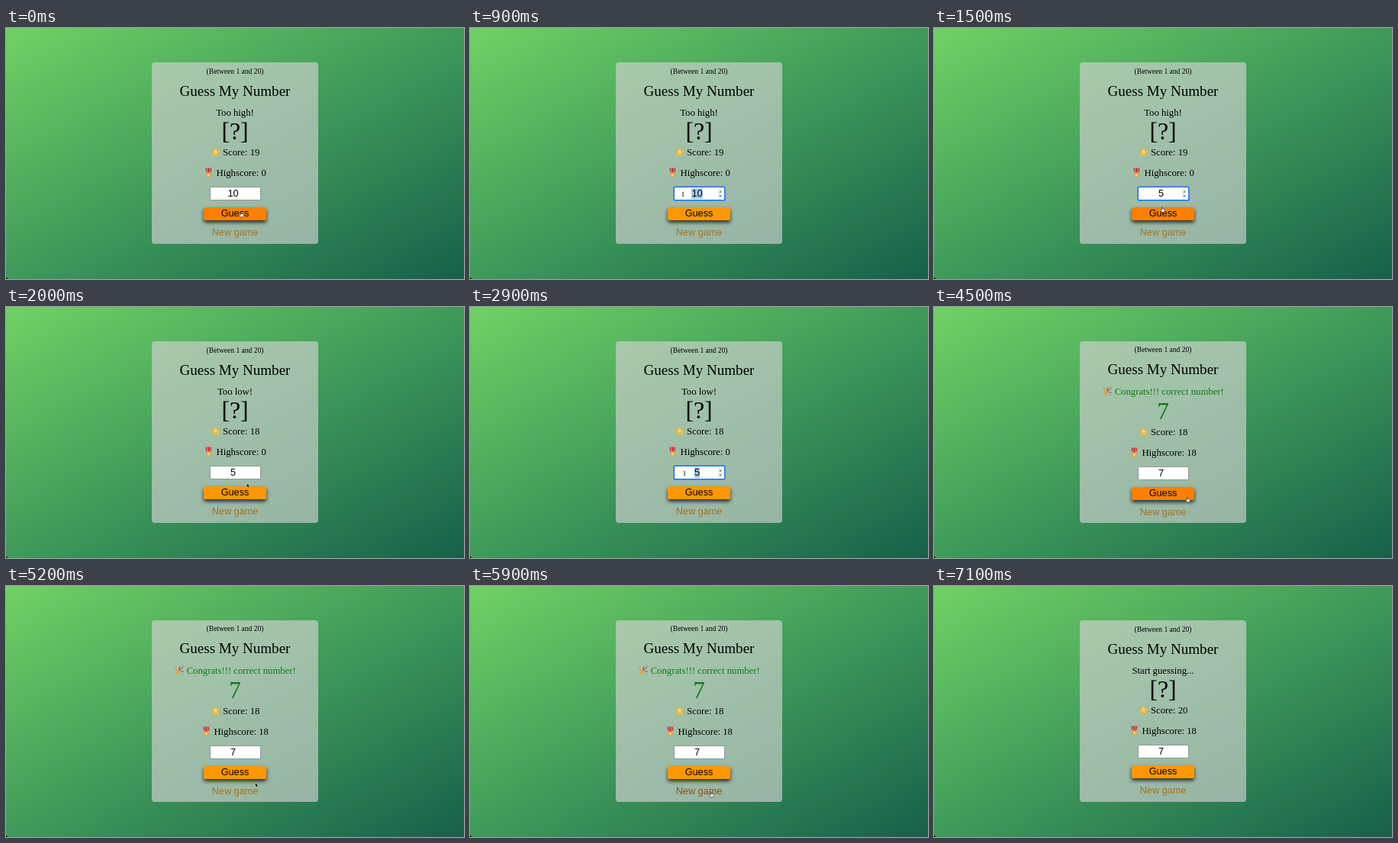
Animation, 600 px wide and 329 px high, one loop 7200 ms. Source, as an HTML page:

```html
<!DOCTYPE html>
<html lang="en">
<head>
<meta charset="utf-8">
<title>Guess My Number</title>
<style>
  html, body { margin: 0; width: 100%; height: 100%; overflow: hidden; }
  #stage {
    position: relative; width: 600px; height: 329px; overflow: hidden;
    background: linear-gradient(to bottom right, #70d264, #3f9a5a 50%, #17604a);
    font: 12.7px/16px "Liberation Serif", Times, serif; color: #000;
  }
  #stage > * { position: absolute; }
  .panel {
    left: 191px; top: 44.5px; width: 218px; height: 238.5px;
    border-radius: 4px; background: rgba(211, 211, 211, .65);
  }
  .corner {
    left: 0; bottom: 0; width: 3px; height: 3px;
    background: radial-gradient(circle at 100% 0, transparent 2.5px, #000 3px);
  }
  .line { left: 0; width: 600px; text-align: center; white-space: pre; }
  .hint { top: 51px; font-size: 9.52px; line-height: 12px; }
  .title { top: 71px; font-size: 19.05px; line-height: 24px; }
  .message { top: 103px; }
  .number { top: 116px; font-size: 31.75px; line-height: 40px; }
  .score { top: 155px; }
  .high { top: 182px; }
  .icon { width: 13.2px; height: 13.2px; vertical-align: -2.5px; overflow: visible; }
  .field, .guess, .again { font-family: "Liberation Sans", Arial, sans-serif; text-align: center; }
  .field {
    left: 266.5px; top: 208px; width: 65px; height: 16px; line-height: 16px;
    border: 1px solid #8d9a90; border-radius: 1px; background: #fff;
  }
  .value { position: absolute; left: 0; width: 60px; top: 0; }
  .value span { display: inline-block; height: 14px; line-height: 14px; }
  .spin { position: absolute; right: 1.5px; top: 1.5px; width: 6px; height: 13px; visibility: hidden; }
  .guess {
    left: 259px; top: 235px; width: 82px; height: 16.5px; border-radius: 2px;
    background: #ff9800; box-shadow: 0 3px 5px rgba(0, 0, 0, .75);
  }
  .again { left: 260px; top: 260px; width: 80px; white-space: nowrap; color: #ad7010; }
  .win .hint, .win .title { margin-top: -1px; }
  .win .number, .win .score, .win .high, .win .field, .win .guess, .win .again { margin-top: 1px; }
  .win .message, .win .number { color: #0c7d18; }
  .party { display: none; }
  .win .party { display: inline; }
  .focus .field { border-color: #1f6fe0; box-shadow: 0 0 0 .5px #1f6fe0; }
  .focus .spin { visibility: visible; }
  .select .value span { background: #a9c9ee; }
  .on-guess .guess { background: #ff8000; }
  .on-again .again { color: #96520c; }
  .pointer { left: 0; top: 0; width: 12px; height: 12px; overflow: visible; }
  .pointer path { visibility: hidden; }
  .pointer .shown { visibility: visible; }
</style>
</head>
<body>
<div id="stage">
  <div class="panel"></div>
  <div class="corner"></div>
  <div class="line hint">(Between 1 and 20)</div>
  <div class="line title">Guess My Number</div>
  <div class="line message"><span class="party"><svg class="icon" viewBox="0 0 13 13">
    <path d="M.4 12.6 4 4.4Q7.8 5.2 8.6 9.2Z" fill="#e9b23c"/>
    <path d="M2 9 4.6 11M3.2 6.3 7 9.8" stroke="#b97a2a" stroke-width=".8"/>
    <path d="M6 6Q8 4.5 6.6 1.6M7.4 7Q8 4 11.6 3.6" fill="none" stroke="#d9434e" stroke-width="1.1"/>
    <path d="M8.4 8.2Q10.4 6.8 12.6 8.4M9 1.2 9.8 2.2" fill="none" stroke="#3c86d8" stroke-width="1.1"/>
    <path d="M2 2h1.3v1.3H2zM10.6 10.6h1.3v1.3h-1.3zM11.4.8h1.2V2h-1.2z" fill="#9a55b8"/>
    <path d="M4.2.8h1.1v1.1H4.2zM9.3 5.2h1.1v1.1H9.3z" fill="#f2cf4a"/>
  </svg> </span><span id="message"></span></div>
  <div class="line number" id="number"></div>
  <div class="line score"><svg class="icon" viewBox="0 0 13 13">
    <path d="M6.5 1 8.1 4.8 12.2 5.1 9 7.8 10 11.8 6.5 9.6 3 11.8 4 7.8.8 5.1 4.9 4.8Z"
      fill="#fbc740" stroke="#f0b03c" stroke-width="1" stroke-linejoin="round"/>
    <path d="M6.5 2.6 7.5 5.6 10 6 6.5 7.2 3.6 6 5.5 5.6Z" fill="#fde38a"/>
  </svg> Score: <span id="score"></span></div>
  <div class="line high"><svg class="icon" viewBox="0 0 13 13">
    <path d="M2.6.4H10V5L6.3 7.4 2.6 5Z" fill="#c8343c"/>
    <path d="M4.6.4V6.2M8 .4V6.2" stroke="#e9a3a0" stroke-width=".8"/>
    <circle cx="6.3" cy="9.4" r="3.2" fill="#e3a23a"/>
    <path d="M6.3 7.2 7 8.7 8.5 8.9 7.4 10 7.7 11.4 6.3 10.7 4.9 11.4 5.2 10 4.1 8.9 5.6 8.7Z" fill="#f9dc7c"/>
  </svg> Highscore: <span id="high"></span></div>
  <div class="field">
    <div class="value"><span id="value"></span></div>
    <svg class="spin" viewBox="0 0 6 13">
      <rect width="6" height="13" fill="#eee"/>
      <path d="M1.4 4.4 3 2.4 4.6 4.4ZM1.4 8.6 3 10.6 4.6 8.6Z" fill="#555"/>
    </svg>
  </div>
  <div class="guess">Guess</div>
  <div class="again">New game</div>
  <svg class="pointer" id="pointer" viewBox="0 0 12 12">
    <path id="arrow" d="M0 0V5.6L1.3 4.5 2.2 6.5 3.1 6.1 2.2 4.2H3.9Z" fill="#000" stroke="#fff" stroke-width=".4"/>
    <path id="beam" d="M-1.4-3Q0-3 0-2V2Q0 3-1.4 3M1.4-3Q0-3 0-2V2Q0 3 1.4 3" fill="none" stroke="#444" stroke-width=".7"/>
    <path id="hand" d="M-.6-1.8Q0-2.6.6-1.8V.4L3.2 1Q3.8 1.4 3.4 3.2L2.8 4.8H-.6L-2.4 2.2Q-2.4 1-.6 2Z"
      fill="#fff" stroke="#222" stroke-width=".6"/>
  </svg>
</div>
<script>
const LOOP = 7200, STEP = 100;
const $ = id => document.getElementById(id);
const stage = $('stage');

const cues = [
  [0, { message: 'Too high!', number: '[?]', score: 19, high: 0, value: '10' }],
  [900, { focus: true, select: true }],
  [1300, { value: '5', select: false }],
  [1700, { message: 'Too low!', score: 18, focus: false }],
  [2700, { focus: true, select: true }],
  [3000, { value: '7', select: false }],
  [3300, { message: 'Congrats!!! correct number!', number: '7', high: 18, win: true, focus: false }],
  [6100, { message: 'Start guessing...', number: '[?]', score: 20, win: false }]
];

// time, x, y
const path = [
  [0, 308, 243], [400, 306, 243], [800, 281, 218], [900, 279, 218], [1300, 279, 218],
  [1600, 306, 243], [1800, 309, 243], [2000, 315.5, 231], [2300, 316, 230],
  [2600, 281, 218], [3000, 281, 218], [3200, 309, 245], [4000, 309, 246],
  [4500, 332, 251], [5000, 332, 251], [5500, 317, 271], [5900, 316, 272],
  [6100, 316, 272], [6400, 438, 270], [6600, 468, 266]
];

const inside = (p, l, t, r, b) => p.x >= l && p.x <= r && p.y >= t && p.y <= b;

function pointerAt(t) {
  const i = path.findIndex(k => k[0] > t);
  if (i < 0) return null;
  const [t0, x0, y0] = path[i - 1], [t1, x1, y1] = path[i];
  const u = (t - t0) / (t1 - t0), e = u * u * (3 - 2 * u);
  return { x: x0 + (x1 - x0) * e, y: y0 + (y1 - y0) * e };
}

function render(t) {
  const s = {};
  for (const [at, patch] of cues) if (at <= t) Object.assign(s, patch);
  for (const id of ['message', 'number', 'score', 'high', 'value']) $(id).textContent = s[id];
  for (const name of ['win', 'focus', 'select']) stage.classList.toggle(name, !!s[name]);

  const p = pointerAt(t);
  const onGuess = !!p && inside(p, 259, 235, 341, 253);
  const onAgain = !!p && inside(p, 268, 261, 332, 277);
  const onField = !!p && inside(p, 267, 208, 333, 226);
  stage.classList.toggle('on-guess', onGuess);
  stage.classList.toggle('on-again', onAgain);
  const shape = p && (onGuess || onAgain ? 'hand' : onField ? 'beam' : 'arrow');
  for (const id of ['arrow', 'beam', 'hand']) $(id).classList.toggle('shown', id === shape);
  if (p) $('pointer').style.transform = `translate(${p.x}px, ${p.y}px)`;
}

const start = performance.now();
let last = -1;
function tick() {
  const t = Math.floor((performance.now() - start) % LOOP / STEP) * STEP;
  if (t !== last) render(last = t);
  requestAnimationFrame(tick);
}
tick();
</script>
</body>
</html>
```
